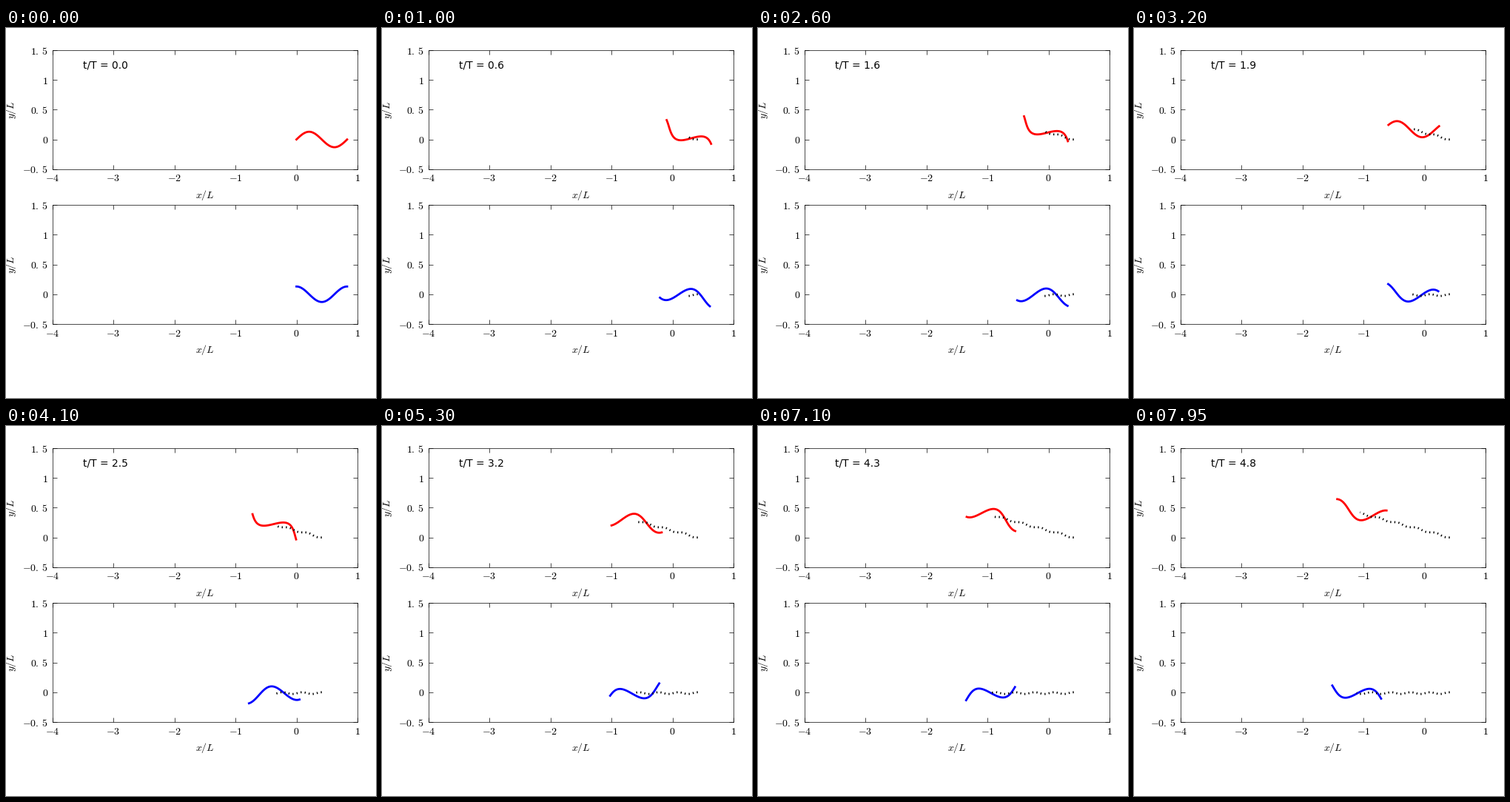
A matplotlib script for the animation above (8000 ms loop, 500 by 500 pixels).

```python
import numpy as np
import matplotlib.pyplot as plt
from matplotlib.animation import FuncAnimation

plt.rcParams.update({
    "font.family": "DejaVu Sans",
    "font.size": 10,
    "mathtext.fontset": "cm",
    "axes.linewidth": 0.5,
    "xtick.direction": "in",
    "ytick.direction": "in",
    "xtick.top": True,
    "ytick.right": True,
    "xtick.major.size": 4,
    "ytick.major.size": 4,
    "xtick.major.width": 0.5,
    "ytick.major.width": 0.5,
    "xtick.major.pad": 4,
    "ytick.major.pad": 4,
})

SIZE = 500
FRAMES, INTERVAL = 160, 50
DT = 0.03               # periods per frame
WAVE, AMP = 0.83, 0.13  # wavelength and amplitude of the body wave
SPEED = 0.327           # body lengths per period
SWING, SWING3 = 0.281, -0.01

times = DT * np.arange(FRAMES)
xi = np.linspace(0, 1, 120)


def yaw(phase):
    return SWING * np.cos(phase) + SWING3 * np.cos(3 * phase)


def integrate(rate):
    steps = 0.5 * (rate[1:] + rate[:-1]) * DT
    return np.concatenate([[0], np.cumsum(steps)])


class Swimmer:
    """Travelling sine wave whose body pitches and drifts along its heading."""

    def __init__(self, ax, color, lag):
        self.phase = 2 * np.pi * (times - lag)
        self.angle = yaw(self.phase) - yaw(self.phase[0])
        self.cx = WAVE / 2 - SPEED * integrate(np.cos(self.angle))
        self.cy = -SPEED * integrate(np.sin(self.angle))
        self.body, = ax.plot([], [], color=color, lw=2)
        self.trail, = ax.plot([], [], color="black", lw=2,
                              ls=(0, (0.5, 1.5)), dash_capstyle="butt")

    def draw(self, i):
        u = WAVE * (xi - 0.5)
        v = AMP * np.sin(2 * np.pi * xi - self.phase[i])
        c, s = np.cos(self.angle[i]), np.sin(self.angle[i])
        self.body.set_data(self.cx[i] + c * u - s * v,
                           self.cy[i] + s * u + c * v)
        self.trail.set_data(self.cx[:i + 1], self.cy[:i + 1])
        return [self.body, self.trail]


def tick_text(value):
    return "$" + f"{value:g}".replace(".", r".\hspace{0.2}") + "$"


def style(ax):
    xs, ys = np.arange(-4, 2), np.arange(-0.5, 1.6, 0.5)
    ax.set_xlim(-4, 1)
    ax.set_ylim(-0.5, 1.5)
    ax.set_xticks(xs, [tick_text(x) for x in xs])
    ax.set_yticks(ys, [tick_text(y) for y in ys])
    box = ax.get_position()
    fig.text((box.x0 + box.x1) / 2, box.y0 - 39 / SIZE, "$x/L$",
             ha="center", va="baseline")
    fig.text(11.5 / SIZE, (box.y0 + box.y1) / 2, "$y/L$", rotation=90,
             rotation_mode="anchor", ha="center", va="baseline")


fig, axes = plt.subplots(2, 1, figsize=(5, 5), dpi=100, facecolor="white")
fig.subplots_adjust(left=0.125, right=0.95, bottom=0.2, top=0.94, hspace=0.3)
for ax in axes:
    style(ax)

swimmers = [Swimmer(axes[0], "red", 0), Swimmer(axes[1], "blue", 0.25)]
clock = axes[0].text(-3.5, 1.2, "")


def update(i):
    clock.set_text(f"t/T = {times[i]:.1f}")
    artists = [clock]
    for swimmer in swimmers:
        artists += swimmer.draw(i)
    return artists


anim = FuncAnimation(fig, update, frames=FRAMES, interval=INTERVAL,
                     init_func=lambda: update(0), repeat=True,
                     repeat_delay=0, blit=False)
plt.show()
```
